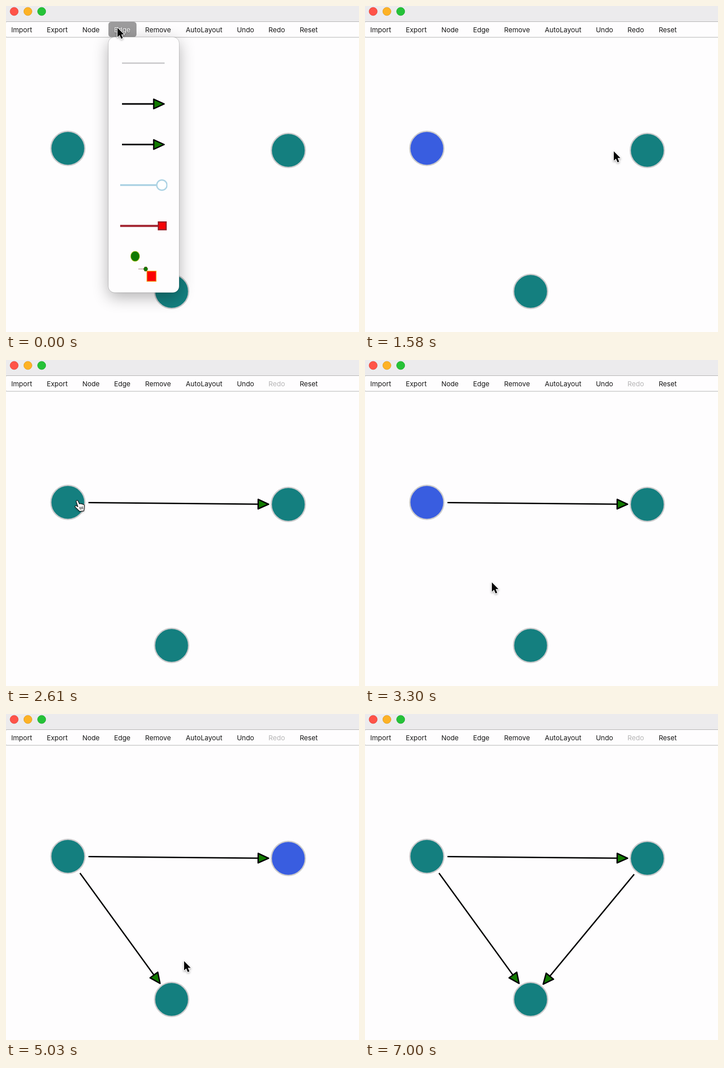
Recreate the animation shown at these times as an HTML page with a canvas. Size 779 px wide and 719 px high, loop 7.09 s.

```html
<!DOCTYPE html>
<html lang="en">
<head>
<meta charset="utf-8">
<title>Graph editor</title>
<style>
html, body { margin: 0; width: 100%; height: 100%; overflow: hidden; background: #fefdfe; }
canvas { display: block; }
</style>
</head>
<body>
<canvas id="stage" width="779" height="719"></canvas>
<script>
const W = 779, H = 719, LOOP = 7090;
const TEAL = '#147f7f', BLUE = '#395de0', GREEN = '#117a00', PAPER = '#fefdfe';
const screen = document.getElementById('stage').getContext('2d');
const layer = document.createElement('canvas');
layer.width = W;
layer.height = H;
const menuCtx = layer.getContext('2d');

const nodes = [[136.5, 314], [623, 318.5], [365.5, 629.5]];
// source node, target node, time of the first and the second click
const links = [[0, 1, 1140, 1900], [0, 2, 2760, 3790], [1, 2, 4590, 6020]];
const buttons = [['Import', 34.5], ['Export', 113], ['Node', 187.5], ['Edge', 256.5], ['Remove', 335.5],
  ['AutoLayout', 437], ['Undo', 528.5], ['Redo', 597.5], ['Reset', 668]];

const CLOSE = 610, CLOSED = 760, HIDE = 6480;
const ease = {
  inOut: u => u * u * (3 - 2 * u),
  in: u => u * u * (2 - u),
  out: u => 1 - (1 - u) * (1 - u)
};
// pointer stops: time, x, y, easing of the way there
const stops = [
  [0, 246, 48], [90, 246, 48], [480, 267, 216], [770, 267, 216],
  [1080, 146, 318], [1214, 146, 318], [1694, 616, 321], [2200, 616, 321],
  [2570, 157, 311], [2980, 157, 311], [3560, 370, 622], [3850, 370, 622],
  [4000, 372, 608], [4070, 372, 608], [4480, 617, 322], [4640, 617, 322],
  [5030, 393, 545, 'in'], [5430, 372, 674, 'out'], [5720, 369, 655]
];

function pointerAt(t) {
  const i = stops.findIndex(s => s[0] > t);
  if (i < 0) return stops[stops.length - 1].slice(1, 3);
  const [t0, x0, y0] = stops[i - 1], [t1, x1, y1, kind = 'inOut'] = stops[i];
  const u = ease[kind]((t - t0) / (t1 - t0));
  return [x0 + (x1 - x0) * u, y0 + (y1 - y0) * u];
}

function shape(c, path, fill, stroke, width = 1) {
  if (fill) { c.fillStyle = fill; c.fill(path); }
  if (stroke) { c.strokeStyle = stroke; c.lineWidth = width; c.stroke(path); }
}

function disc(c, x, y, r, fill, stroke, width, ry = r) {
  const p = new Path2D();
  p.ellipse(x, y, r, ry, 0, 0, Math.PI * 2);
  shape(c, p, fill, stroke, width);
}

function box(c, x, y, w, h, r, fill, stroke, width) {
  const p = new Path2D();
  p.roundRect(x, y, w, h, r);
  shape(c, p, fill, stroke, width);
}

function line(c, x0, x1, y, color, width) {
  c.fillStyle = color;
  c.fillRect(x0, y - width / 2, x1 - x0, width);
}

function shadow(c, color, blur, dy) {
  c.shadowColor = color;
  c.shadowBlur = blur;
  c.shadowOffsetY = dy;
}

// arrow along the x axis, tip at the given length
function arrow(c, length) {
  line(c, 0, length - 23, 0, '#000', 3);
  c.lineJoin = 'round';
  shape(c, new Path2D(`M${length - 23} -10.5 V10.5 L${length} 0 Z`), GREEN, '#000', 3);
}

function edge(c, [x0, y0], [x1, y1]) {
  c.save();
  c.translate(x0, y0);
  c.rotate(Math.atan2(y1 - y0, x1 - x0));
  c.translate(45.5, 0);
  arrow(c, Math.hypot(x1 - x0, y1 - y0) - 45.5 - 43.5);
  c.restore();
}

function label(c, text, x, color) {
  c.font = '15px Inter, "Open Sans", sans-serif';
  c.textAlign = 'center';
  c.textBaseline = 'alphabetic';
  c.fillStyle = color;
  c.fillText(text, x, 57.5);
}

function drawWindow(c, t) {
  c.fillStyle = PAPER;
  c.fillRect(0, 0, W, H);
  c.fillStyle = '#ecebed';
  c.fillRect(0, 0, W, 36);
  disc(c, 18, 12, 9, '#ff5349', '#e2463e', 1);
  disc(c, 48.3, 12, 9, '#fdb226', '#e09e1f', 1);
  disc(c, 78.7, 12, 9, '#25c238', '#20ab30', 1);
  box(c, -1.5, 34.5, W + 10, 34.5, 4, PAPER, '#aaa9aa', 1.2);
  for (const [text, x] of buttons) {
    const off = text === 'Redo' && t >= links[0][3];
    if (text === 'Edge' && t < CLOSE) {
      box(c, 226, 35, 62, 33.5, 6, '#9c9b9c');
      c.save();
      shadow(c, 'rgba(0,0,0,.45)', 2, 1);
      label(c, text, x, '#fff');
      c.restore();
    } else {
      label(c, text, x, off ? '#b5b4b5' : '#161616');
    }
  }
}

function drawGraph(c, t) {
  for (const [a, b, , made] of links) if (t >= made) edge(c, nodes[a], nodes[b]);
  nodes.forEach(([x, y], i) => {
    const picked = links.some(([a, , from, to]) => a === i && t >= from && t < to);
    disc(c, x, y, 37.6, picked ? BLUE : TEAL, '#cbcbcd', 2.8);
  });
}

function drawMenu(c, [px, py]) {
  c.clearRect(0, 0, W, H);
  c.save();
  shadow(c, 'rgba(0,0,0,.3)', 34, 10);
  box(c, 226, 68.5, 156, 563.5, 14, '#fefdfe');
  c.restore();
  box(c, 225.7, 68.3, 156.6, 564, 14, null, 'rgba(0,0,0,.24)', .8);

  const item = Math.floor((py - 92) / 90);
  if (item >= 0 && item < 6 && px > 244 && px < 364 && (py - 92) % 90 < 68) {
    box(c, 244, 92 + item * 90, 120, 68, 14, '#a8a6a8');
  }

  line(c, 256, 350, 126, '#c8c7ca', 3);
  for (const y of [216, 305.5]) {
    line(c, 256, 325, y, '#aaa9ae', 4.4);
    c.save();
    c.translate(256, y);
    arrow(c, 93);
    c.restore();
  }

  line(c, 252, 332, 395, '#add3e4', 4);
  c.save();
  c.beginPath();
  c.rect(326, 380, 30.3, 30);
  c.clip();
  disc(c, 344, 395, 11.3, '#fff', '#add3e4', 3);
  c.restore();

  line(c, 252, 335, 485, '#d5a1a6', 5.6);
  line(c, 252, 335, 485, '#9f1b27', 3.6);
  box(c, 336.2, 476.2, 17.2, 17.2, 0, '#f50508', '#96202a', 2.6);

  disc(c, 285, 552, 9.8, GREEN, '#a9bd10', 1.2, 11);
  line(c, 292, 304, 580, '#b08a8c', 1.4);
  shape(c, new Path2D('M303.5 580 L306 575.5 H310.5 L313 580 L310.5 584.8 H306 Z'), GREEN, '#6b5b20', .9);
  box(c, 311, 584.7, 20.3, 22.6, 0, '#fb0303', '#f0a010', 1.4);
}

const arrowCursor = new Path2D('M0 0 V20.5 L4.7 16.2 L8.2 24.2 L11.8 22.6 L8.4 14.8 H14.6 Z');
const handCursor = new Path2D('M-2.2 1 Q-1.6 -2.4 1.6 -.8 L5 6.6 Q7 4.6 9 6.8 Q11.2 5.2 12.8 7.8 ' +
  'Q15.4 6.8 15.8 10 L16 16 L14.6 22 L5.4 22.6 L1 18.4 L-4.6 13 Q-5.2 9.4 -1.4 10.8 L1.8 12.6 Z');
const handLines = new Path2D('M5.6 13 L7.2 18.8 M8.8 12.6 L10 18.4 M12 12.2 L12.8 18');

function drawPointer(c, [x, y], t) {
  const over = t > CLOSED && nodes.some(([nx, ny]) => Math.hypot(x - nx, y - ny) < 39);
  c.save();
  c.translate(x, y);
  c.lineJoin = 'round';
  shadow(c, 'rgba(0,0,0,.35)', 4, 2);
  if (over) {
    shape(c, handCursor, '#fff');
    c.shadowColor = 'transparent';
    shape(c, handCursor, null, '#111', 1.3);
    shape(c, handLines, null, '#111', 1.2);
  } else {
    shape(c, arrowCursor, null, '#fff', 2.6);
    c.shadowColor = 'transparent';
    shape(c, arrowCursor, '#050505');
  }
  c.restore();
}

function draw(t) {
  const pointer = pointerAt(t);
  drawWindow(screen, t);
  drawGraph(screen, t);
  if (t < CLOSED) {
    drawMenu(menuCtx, pointer);
    screen.globalAlpha = Math.min(1, (CLOSED - t) / (CLOSED - CLOSE));
    screen.drawImage(layer, 0, 0);
    screen.globalAlpha = 1;
  }
  if (t < HIDE) drawPointer(screen, pointer, t);
}

let start;
function tick(now) {
  if (start === undefined) start = now;
  draw((now - start) % LOOP);
  requestAnimationFrame(tick);
}
draw(0);
requestAnimationFrame(tick);
</script>
</body>
</html>
```
